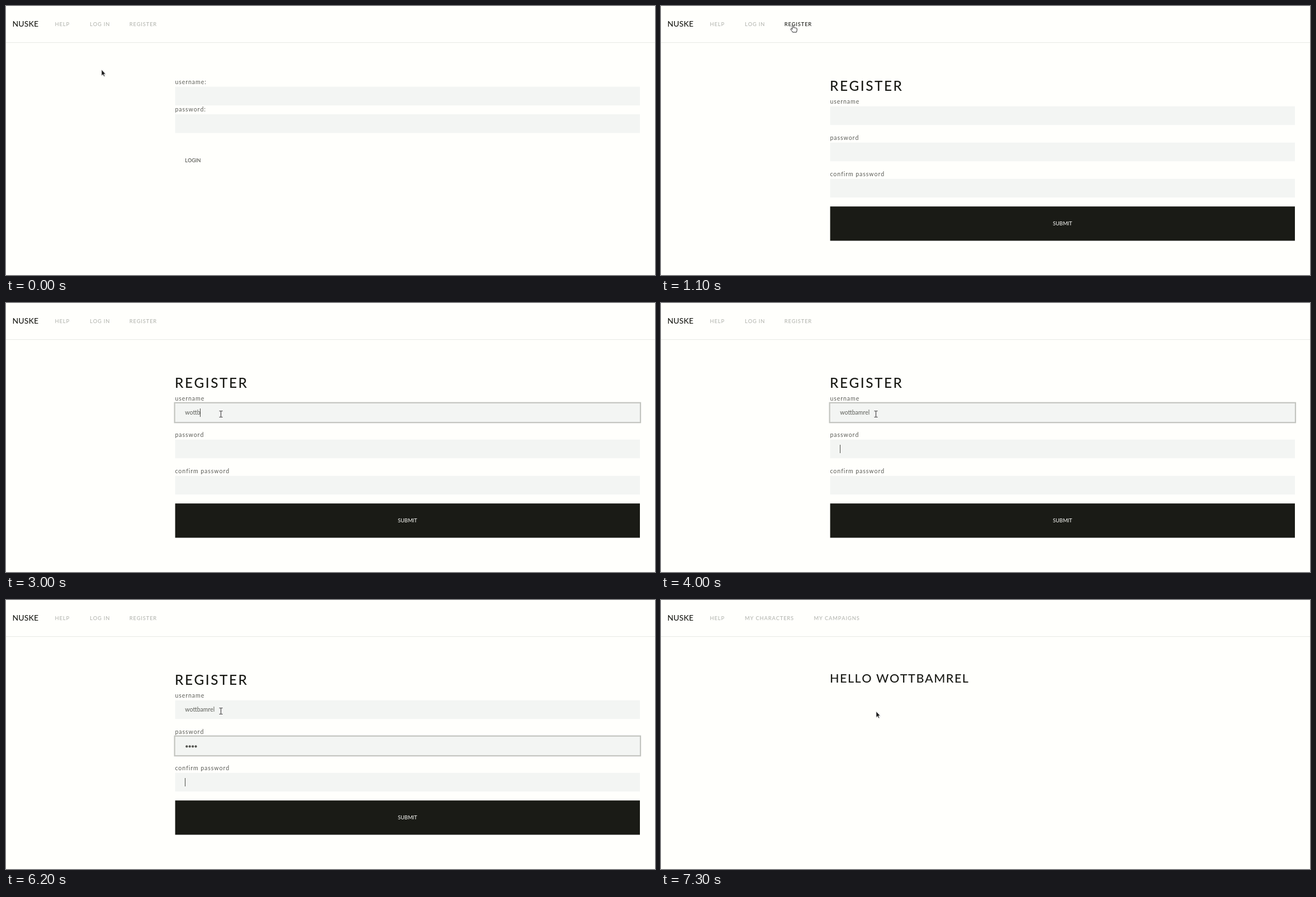
An HTML page that plays this animation: 1161x482 px, repeating every 9800 ms.

```html
<!DOCTYPE html>
<html lang="en">
<head>
<meta charset="utf-8">
<title>Register</title>
<style>
  html, body { margin: 0; width: 100%; height: 100%; overflow: hidden; background: #fffffc; }
  svg { display: block; }
  text { font-family: Lato, "Open Sans", sans-serif; font-kerning: none; fill: #5c5d58; }
  .brand { font-size: 13.9px; font-weight: 500; letter-spacing: .2px; fill: #1a1b16; }
  .nav { font-size: 9.3px; font-weight: 500; letter-spacing: .87px; fill: #b4b6b0; }
  .nav.hover { fill: #1a1b16; }
  .label { font-size: 10.6px; letter-spacing: .92px; }
  .title { font-size: 24.4px; font-weight: 500; letter-spacing: 2.5px; fill: #1a1b16; }
  .hello { font-size: 21.6px; font-weight: 500; letter-spacing: 1.5px; fill: #1a1b16; }
  .login { font-size: 9.1px; font-weight: 600; }
  .submit { font-size: 9.3px; fill: #fffffc; text-anchor: middle; }
  .value { font-size: 10.5px; }
  .field { fill: #f3f5f3; }
  .ring { fill: none; stroke: #c2c4bf; }
  .dot { fill: #555651; }
</style>
</head>
<body>
<svg id="stage" width="1161" height="482" viewBox="0 0 1161 482">
  <rect y="65" width="1161" height="1" fill="#e8eae5"/>
  <text class="brand" x="11.5" y="37">NUSKE</text>
  <text class="nav" x="87.6" y="36">HELP</text>
  <g id="guest"></g>
  <g id="member"></g>
  <g id="loginPage"></g>
  <g id="registerPage"></g>
  <rect id="caret" width="1" height="15" fill="#4a4b46" shape-rendering="crispEdges"/>
  <g id="pointer">
    <g id="arrow" transform="translate(.4 .6) scale(.88)">
      <path d="M.7 1.2V13.6L3.6 10.9 5.4 15 7.6 14 5.8 10H9.2Z" fill="#000" opacity=".16"/>
      <path d="M0 0V12.4L2.9 9.7 4.7 13.8 6.7 12.9 4.9 8.9H8.4Z" fill="#1b1b1b"
            stroke="#fff" stroke-width=".8"/>
    </g>
    <path id="hand" d="M-1.2 8V1.2a1.2 1.2 0 0 1 2.4 0V5q1.1-.8 2 .2 1.1-.7 2 .4 1.6-.6 2 .9V9.4Q7.2 11 6.2 13H-.4Q-1.4 11-3.8 8.4-4.6 7-3.2 6.6-2.2 6.6-1.2 8Z"
          fill="#fff" stroke="#222" stroke-width="1" stroke-linejoin="round"/>
    <g id="beam" fill="none" stroke-linecap="square">
      <path d="M-2.5-5.5H-.7L0-5 .7-5.5H2.5M0-5V5M-2.5 5.5H-.7L0 5 .7 5.5H2.5" stroke="#fff" stroke-width="2.4"/>
      <path d="M-2.5-5.5H-.7L0-5 .7-5.5H2.5M0-5V5M-2.5 5.5H-.7L0 5 .7 5.5H2.5" stroke="#222" stroke-width="1"/>
    </g>
  </g>
</svg>
<script>
const LOOP = 9800, STEP = 100;
const USER = "wottbamrel";
const LEFT = 302.6, WIDE = 831.4, HIGH = 33.5;
const TOPS = [179.7, 244.7, 309.7];
const $ = id => document.getElementById(id);

function add(parent, tag, attrs, text = "") {
  const el = document.createElementNS("http://www.w3.org/2000/svg", tag);
  for (const key in attrs) el.setAttribute(key, attrs[key]);
  el.textContent = text;
  parent.append(el);
  return el;
}
const write = (parent, cls, x, y, text) => add(parent, "text", { class: cls, x, y }, text);
const field = (parent, y) =>
  add(parent, "rect", { class: "field", x: LEFT, y, width: WIDE, height: HIGH });
const show = (el, on) => el.setAttribute("visibility", on ? "visible" : "hidden");

const guest = $("guest"), member = $("member");
const loginPage = $("loginPage"), registerPage = $("registerPage");

write(guest, "nav", 150, 36, "LOG IN");
const registerLink = write(guest, "nav", 220.7, 36, "REGISTER");
write(member, "nav", 150, 36, "MY CHARACTERS");
write(member, "nav", 273.5, 36, "MY CAMPAIGNS");
write(member, "hello", 302, 148.3, "HELLO " + USER.toUpperCase());

write(loginPage, "label", 302.4, 140, "username:");
field(loginPage, 144.6);
write(loginPage, "label", 302.4, 189, "password:");
field(loginPage, 194);
write(loginPage, "login", 320.2, 280.4, "LOGIN");

write(registerPage, "title", 302.1, 151.6, "REGISTER");
["username", "password", "confirm password"].forEach((name, i) => {
  write(registerPage, "label", 302.4, 175 + 65 * i, name);
  field(registerPage, TOPS[i]);
});
add(registerPage, "rect", { x: LEFT, y: 359.2, width: WIDE, height: 61.4, fill: "#1a1b16" });
write(registerPage, "submit", 718.3, 393, "SUBMIT");
const ring = add(registerPage, "rect",
  { class: "ring", x: LEFT - 1, width: WIDE + 2, height: HIGH + 2 });
const userText = write(registerPage, "value", 320.3, 200, "");
const dots = [1, 2].map(row => [0, 1, 2, 3].map(i =>
  add(registerPage, "circle", { class: "dot", cx: 323.3 + 5.4 * i, cy: 197.4 + 65 * row, r: 2.1 })));

// Each table lists [time, value]; the last entry reached holds.
const typedUser = [[0, 0], [2300, 1], [2500, 2], [2600, 3], [2800, 4], [3000, 5],
  [3100, 7], [3500, 8], [3700, 9], [3800, 10]];
const typedPass = [[0, 0], [5700, 1], [5900, 2], [6100, 4]];
const typedConfirm = [[0, 0], [6500, 1], [6700, 2], [6800, 3], [7000, 4]];
const caretRow = [[0, -1], [1800, 0], [4000, 1], [4500, -1], [5500, 1], [6200, 2], [7300, -1]];
const ringState = [[0, [-1, 0]], [1800, [0, 1.5]], [1900, [0, 2.2]], [4100, [1, 1.5]],
  [4500, [1, 2.2]], [6300, [2, 1.5]], [6400, [2, 2.2]]];
const mouse = [
  { from: 200, to: 800, a: [170.5, 113.5], b: [236, 34] },
  { from: 1100, to: 1700, a: [236, 34], b: [384.5, 199] }
];

function at(table, t) {
  let value = table[0][1];
  for (const [time, v] of table) if (t >= time) value = v;
  return value;
}

function mouseAt(t) {
  const { from, to, a, b } = t < mouse[1].from ? mouse[0] : mouse[1];
  const p = Math.min(1, Math.max(0, (t - from) / (to - from)));
  const e = p * p * (3 - 2 * p);
  return a.map((v, i) => v + (b[i] - v) * e);
}

function draw(ms) {
  const t = Math.floor(ms / STEP) * STEP;
  const page = t < 1100 ? "login" : t < 7300 ? "register" : "hello";
  const onForm = page === "register";

  show(guest, page !== "hello");
  show(member, page === "hello");
  show(loginPage, page === "login");
  show(registerPage, onForm);

  const [x, y] = mouseAt(t);
  const overLink = page !== "hello" && y < 60 && x > 203 && x < 288;
  const overField = onForm && x > LEFT && y > TOPS[0];
  $("pointer").setAttribute("transform", `translate(${x} ${y})`);
  show($("hand"), overLink);
  show($("beam"), overField);
  show($("arrow"), !overLink && !overField);
  registerLink.setAttribute("class", overLink ? "nav hover" : "nav");

  const counts = [at(typedUser, t), at(typedPass, t), at(typedConfirm, t)];
  userText.textContent = USER.slice(0, counts[0]);
  dots.forEach((row, r) => row.forEach((dot, i) => show(dot, onForm && i < counts[r + 1])));

  const [row, weight] = at(ringState, t);
  show(ring, onForm && row >= 0);
  if (row >= 0) {
    ring.setAttribute("y", TOPS[row] - 1);
    ring.setAttribute("stroke-width", weight);
  }

  const line = at(caretRow, t);
  show($("caret"), line >= 0);
  if (line >= 0) {
    const width = line ? 5.4 * counts[line] : counts[0] ? userText.getComputedTextLength() : 0;
    $("caret").setAttribute("x", 320 + Math.round(width));
    $("caret").setAttribute("y", 189 + 65 * line);
  }
}

const start = performance.now();
function tick() {
  draw((performance.now() - start) % LOOP);
  requestAnimationFrame(tick);
}
tick();
</script>
</body>
</html>
```
